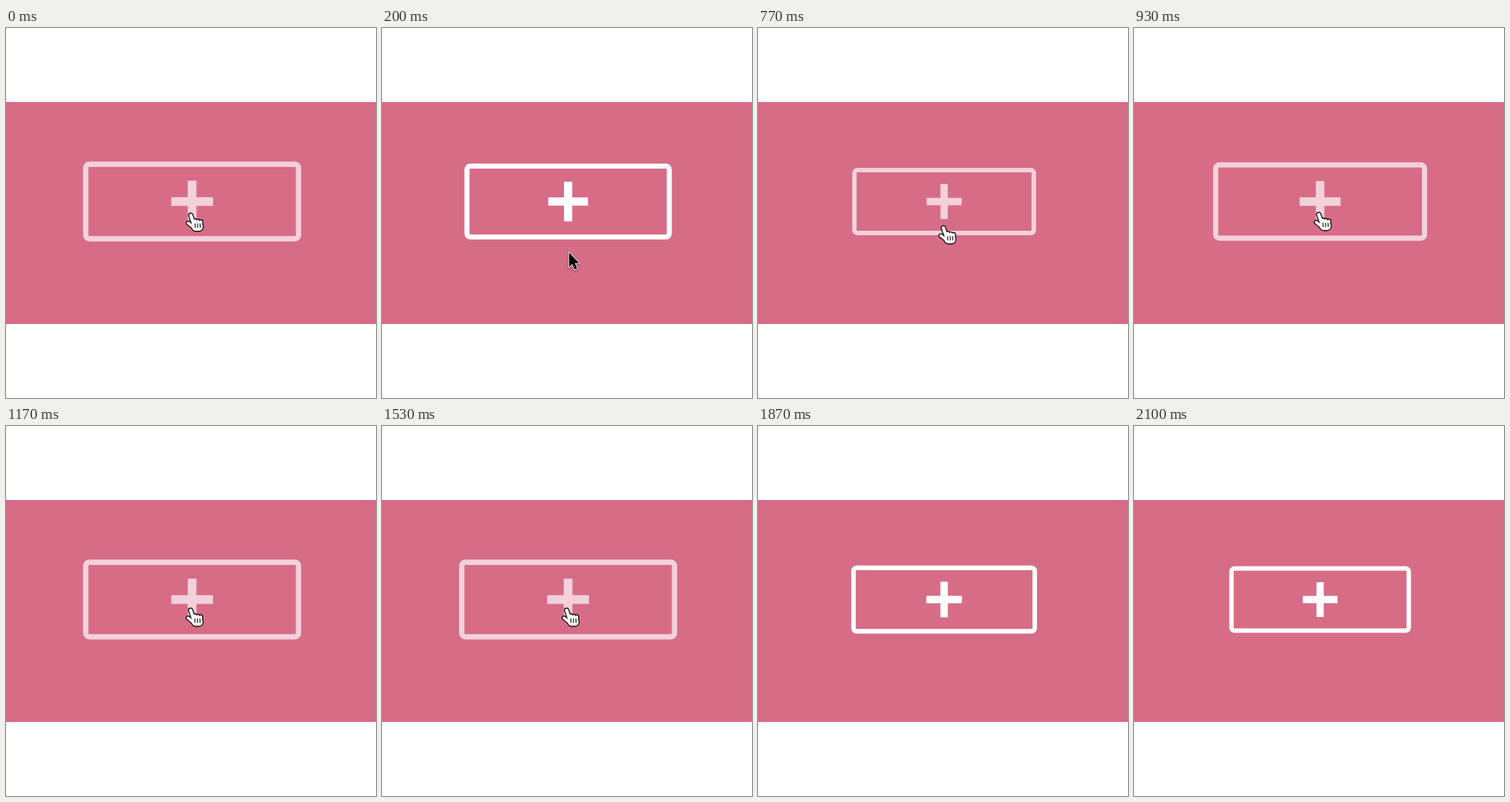
An HTML page with a canvas for the animation above (2830 ms loop, 500 px wide and 500 px high).

```html
<!DOCTYPE html>
<html lang="en">
<head>
<meta charset="utf-8">
<title>Hover button</title>
<style>
html, body { margin: 0; width: 100%; height: 100%; overflow: hidden; background: #fff; }
canvas { display: block; width: 500px; height: 500px; }
</style>
</head>
<body>
<canvas id="stage" width="500" height="500"></canvas>
<script>
const ctx = document.getElementById('stage').getContext('2d');
const LOOP = 2830;
const LEAVE = 140, ENTER = 748, LEAVE_AGAIN = 1688, FADE = 300;
const PINK = '#d76c87', PALE = '#f3d1db', DARK = '#1a1014';

const clamp = v => Math.max(0, Math.min(1, v));
const progress = (t, from, length) => clamp((t - from) / length);

// CSS-style cubic-bezier timing
function bezier(x1, y1, x2, y2) {
  const curve = (u, a, b) => 3 * a * u * (1 - u) ** 2 + 3 * b * u * u * (1 - u) + u ** 3;
  return x => {
    if (x <= 0 || x >= 1) return clamp(x);
    let lo = 0, hi = 1;
    for (let i = 0; i < 24; i++) {
      const mid = (lo + hi) / 2;
      if (curve(mid, x1, x2) < x) lo = mid; else hi = mid;
    }
    return curve(lo, y1, y2);
  };
}
const ease = bezier(.25, .1, .25, 1);
const glide = bezier(.4, 0, .1, 1);

const isHover = t => t < LEAVE || (t >= ENTER && t < LEAVE_AGAIN);

function growth(t) {
  const fade = from => ease(progress(t, from, FADE));
  return 1 - fade(LEAVE) + fade(ENTER) - fade(LEAVE_AGAIN);
}

// The pointer slows to a stop below, glides back, then speeds off the stage
function pointerY(t) {
  if (t < 545) return 327 - 77 * (1 - progress(t, 0, 470)) ** 2;
  if (t < 1530) return 327 - 81 * glide(progress(t, 545, 525));
  return 246 + 93 * ((t - 1530) / 240) ** 1.8;
}

function drawButton(scale, hover) {
  ctx.save();
  ctx.translate(251.5, 234.5);
  ctx.scale(scale, scale);
  ctx.filter = 'blur(0.7px)';
  ctx.fillStyle = ctx.strokeStyle = hover ? PALE : '#fff';
  ctx.lineWidth = 6;
  ctx.beginPath();
  ctx.roundRect(-119.8, -42, 239.6, 84, 4);
  ctx.stroke();
  ctx.fillRect(-23.5, -4.9, 47, 9.8);
  ctx.fillRect(-4.9, -23.5, 9.8, 47);
  ctx.restore();
}

function line(x1, y1, x2, y2, width) {
  ctx.lineWidth = width;
  ctx.beginPath();
  ctx.moveTo(x1, y1);
  ctx.lineTo(x2, y2);
  ctx.stroke();
}

// Index finger, thumb, palm and three knuckles, each a round-ended line
function hand(color, extra) {
  ctx.strokeStyle = color;
  line(.5, 3, 4.5, 15, 4.4 + extra);
  line(-3, 13.5, 4, 19, 3.8 + extra);
  line(7.5, 18.5, 11.3, 18.5, 11 + extra);
  for (let i = 0; i < 3; i++) line(6.3 + 3.9 * i, 10.5 + .8 * i, 6.8 + 3.4 * i, 17, 4.2 + extra);
}

function drawHand() {
  ctx.lineCap = 'round';
  hand(DARK, 2.8);
  hand('#fff', 0);
  ctx.strokeStyle = DARK;
  for (let x = 6.2; x < 14; x += 3.4) line(x, 14.5, x + .3, 19.5, 1.2);
}

function drawArrow() {
  ctx.translate(1, 2);
  ctx.scale(.95, .95);
  ctx.lineJoin = 'round';
  ctx.lineWidth = 2.2;
  ctx.strokeStyle = '#f6e4e9';
  ctx.fillStyle = '#0c080a';
  const arrow = new Path2D('M0 0V20.5L4.7 16.2L8 24.2L11.6 22.6L8.2 14.9H14.6Z');
  ctx.shadowColor = 'rgba(40, 10, 20, .5)';
  ctx.shadowBlur = 3;
  ctx.shadowOffsetY = 1.2;
  ctx.stroke(arrow);
  ctx.shadowColor = 'transparent';
  ctx.fill(arrow);
}

function drawPointer(t, hover) {
  const y = pointerY(t);
  ctx.save();
  ctx.translate(249 + 3 * clamp((y - 246) / 60), y);
  ctx.filter = 'blur(0.3px)';
  if (hover) drawHand(); else drawArrow();
  ctx.restore();
}

// Thirty pictures a second, on whole centiseconds
function step(t) {
  const rest = t % 100;
  return t - rest + (rest < 30 ? 0 : rest < 70 ? 30 : 70);
}

function draw(t) {
  const hover = isHover(t);
  ctx.fillStyle = '#fff';
  ctx.fillRect(0, 0, 500, 500);
  ctx.save();
  ctx.beginPath();
  ctx.rect(0, 100, 500, 300);
  ctx.clip();
  ctx.fillStyle = PINK;
  ctx.fillRect(0, 100, 500, 300);
  drawButton(1 + .2 * growth(t), hover);
  drawPointer(t, hover);
  ctx.restore();
}

const start = performance.now();
function tick() {
  draw(step((performance.now() - start) % LOOP));
  requestAnimationFrame(tick);
}
tick();
</script>
</body>
</html>
```
